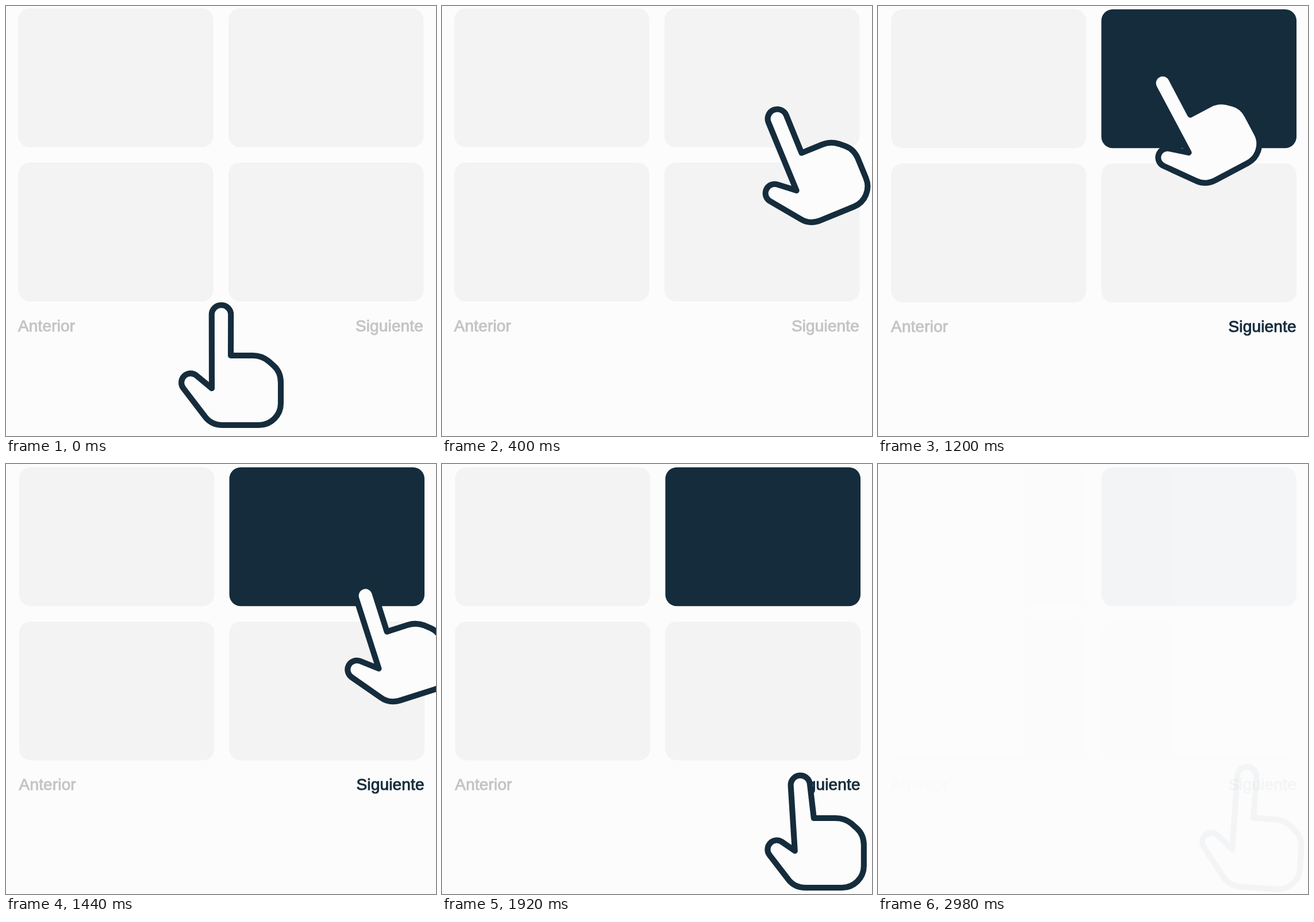
Recreate the animation shown at these times as an HTML page. Size 748 px wide and 748 px high, loop 3.14 s.

```html
<!DOCTYPE html>
<html lang="es">
<head>
<meta charset="utf-8">
<title>Selección</title>
<style>
  html, body { margin: 0; width: 100%; height: 100%; overflow: hidden; background: #fcfcfc; }
  svg { display: block; width: 100vw; height: 100vh; }
  text { font: 28px "Liberation Sans", Arial, sans-serif; letter-spacing: .15px; stroke-width: .95; }
  .light { fill: #f3f3f3; }
  .dark { fill: #152c3c; }
  .muted { fill: #c4c4c4; stroke: #c4c4c4; }
  .strong { fill: #152c3c; stroke: #152c3c; }
  #hand path { stroke: #152c3c; stroke-width: 10.1; stroke-linejoin: round; stroke-linecap: round; }
</style>
</head>
<body>
<svg viewBox="0 0 748 748">
  <g id="chosen" transform="translate(1.6 1.6)"></g>
  <g id="idle"></g>
  <g id="hand">
    <g id="press">
      <path id="outline" fill="#fcfcfc"/>
      <path id="sparks" fill="none" d="M327.6 524.3L336.5 533.6M371.7 502.6L372 515.9M416.6 525.9L408.1 536.5"/>
    </g>
  </g>
</svg>
<script>
const LOOP = 3140;
const $ = id => document.getElementById(id);
const clamp = v => Math.min(1, Math.max(0, v));
const ramp = (t, from, to) => clamp((t - from) / (to - from));
const smooth = (t, from, to) => {
  const p = ramp(t, from, to);
  return p * p * (3 - 2 * p);
};

function page(cardClass, nextClass) {
  const card = (x, y, cls) =>
    `<rect class="${cls}" x="${x}" y="${y}" width="339.5" height="241.6" rx="20"/>`;
  return card(21.2, 4.1, 'light') + card(386.9, 4.1, cardClass) +
    card(21.2, 272.3, 'light') + card(386.9, 272.3, 'light') +
    '<text class="muted" x="21" y="565.5">Anterior</text>' +
    `<text class="${nextClass}" x="726" y="565.5" text-anchor="end">Siguiente</text>`;
}
$('idle').innerHTML = page('light', 'muted');
$('chosen').innerHTML = page('dark', 'strong');

// Each move: time span, cubic path of the palm, turn in degrees
const moves = [
  { from: 0, to: 574, path: [[391, 624], [450, 500], [798, 282], [540, 199.8]], turn: [0, -28.5] },
  { from: 1140, to: 1920, path: [[540, 199.8], [748, 266], [680, 480], [652, 631.5]], turn: [-28.5, 4] }
];
const clicks = [600, 1750];

function bezier(pts, p) {
  const q = 1 - p;
  const w = [q * q * q, 3 * q * q * p, 3 * q * p * p, p * p * p];
  return [0, 1].map(axis => pts.reduce((sum, pt, i) => sum + w[i] * pt[axis], 0));
}

// k is how far the finger is pressed, from 0 to 1
function outline(k) {
  const r = 16.7, tilt = k * 5 * Math.PI / 180;
  const cx = 374.5 - 7 * k, cy = 537 + 13.5 * k;
  const dx = r * Math.cos(tilt), dy = r * Math.sin(tilt);
  const tx = 5.5 * k, ty = 7.5 * k;
  return 'M391 608H429Q445 608 457 618L466 626Q478 637 478 655V691' +
    'A38 38 0 0 1 440 729H377Q357 729 346 714' +
    `L${308.5 + tx} ${665 + ty}A16 16 0 0 1 ${331.3 + tx} ${642.8 + ty}L358 665` +
    `L${cx - dx} ${cy + dy}A${r} ${r} 0 0 1 ${cx + dx} ${cy - dy}Z`;
}

function draw(t) {
  const stage = t < moves[1].from ? 0 : 1;
  const { from, to, path, turn } = moves[stage];
  const p = smooth(t, from, to);
  const [x, y] = bezier(path, p);
  const angle = turn[0] + (turn[1] - turn[0]) * p;
  $('hand').setAttribute('transform', `translate(${x} ${y}) rotate(${angle}) translate(-391 -624)`);

  const c = t - clicks[stage];
  const k = smooth(c, 0, 170) - smooth(c, 250, 460);
  $('press').setAttribute('transform', `rotate(${-4 * k} 400 698)`);
  $('outline').setAttribute('d', outline(k));
  $('sparks').setAttribute('opacity', ramp(c, 175, 215) - ramp(c, 300, 380));

  const fade = Math.max(.03, 1 - ramp(t, 2470, 2995));
  $('idle').setAttribute('opacity', 1 - smooth(t, 610, 1070));
  $('chosen').setAttribute('opacity', t < clicks[0] ? 0 : fade);
  $('hand').setAttribute('opacity', fade);
}

const start = performance.now();
function tick(now) {
  draw(Math.max(0, now - start) % LOOP);
  requestAnimationFrame(tick);
}
draw(0);
requestAnimationFrame(tick);
</script>
</body>
</html>
```
